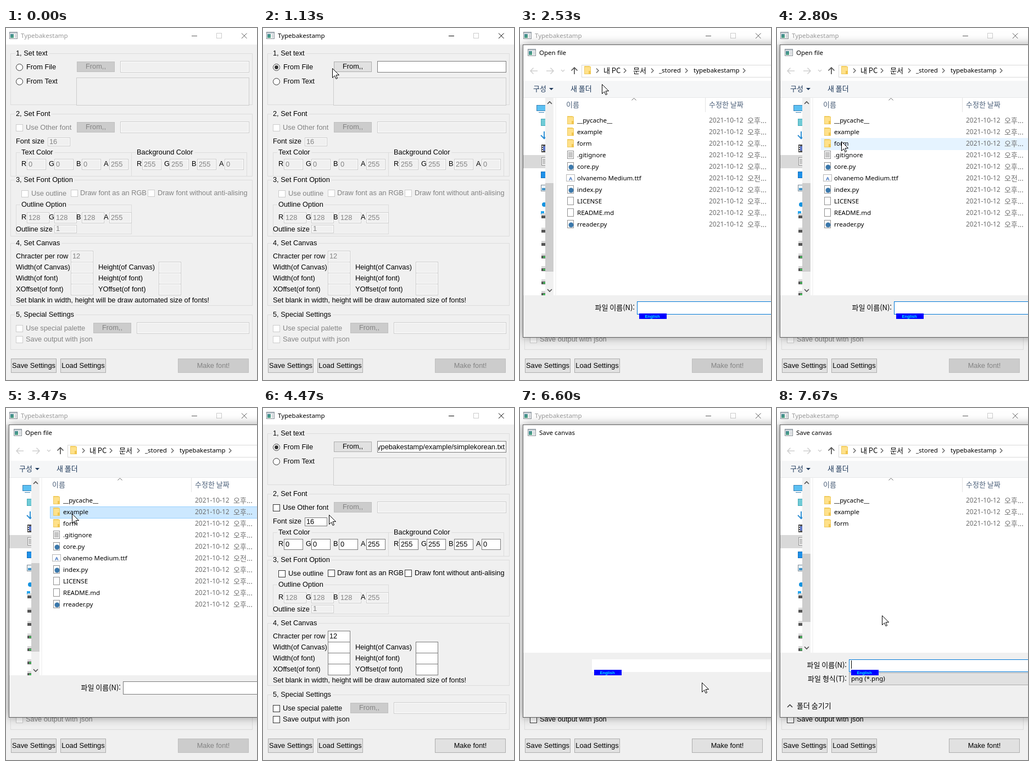
Animation of 457x640 px, one loop 8000 ms. Source, as an HTML page with a canvas:

```html
<!DOCTYPE html>
<html lang="ko">
<head>
<meta charset="utf-8">
<style>
html, body { margin: 0; width: 100%; height: 100%; overflow: hidden; background: #f0f0f0; }
canvas { display: block; width: 100vw; height: 100vh; }
</style>
</head>
<body>
<canvas id="stage" width="457" height="640"></canvas>
<script>
const c = document.getElementById('stage').getContext('2d');
const LOOP = 8000, STEP = 200 / 3;
const FORM = "12.8px 'Liberation Sans', sans-serif";
const UI = "11.5px 'Noto Sans', 'Noto Sans CJK KR', sans-serif";
const DATE = "12px 'Noto Sans', sans-serif";
const KO = "13px 'Noto Sans CJK KR', 'Noto Sans CJK JP', 'Noto Sans CJK', sans-serif";
const GRAY = '#838383', BLUE = '#0078d7', FACE = '#f0f0f0';
const APP = 'Typebakestamp', PROJECT = 'typebakestamp';

const FOLDERS = [['folder', '__pycache__'], ['folder', 'example'], ['folder', 'form']];
const FILES = [...FOLDERS, ['text', '.gitignore'], ['script', 'core.py'], ['font', 'olvanemo Medium.ttf', '오전...'],
  ['script', 'index.py'], ['page', 'LICENSE'], ['page', 'README.md'], ['script', 'rreader.py']];
const SAMPLES = [['text', 'simpleenglish.txt'], ['text', 'simplekorean.txt']];

// Pointer stops: time, x, y
const PATH = [[200, 314, 190], [470, 25, 72], [800, 25, 72], [1200, 158, 73], [2330, 158, 73], [2800, 117, 206],
  [3060, 117, 206], [3130, 120, 192], [3860, 120, 192], [3871, 120, 194], [5260, 120, 194], [5800, 343, 601],
  [6400, 343, 601], [7000, 300, 222], [7130, 300, 222], [7470, 191, 377]];

let t = 0, pointer = null, dialogOpen = false;

const between = (a, b) => t >= a && t < b;

function pointerAt() {
  if (t < PATH[0][0]) return null;
  const i = PATH.findIndex(p => p[0] > t);
  if (i < 0) return PATH.at(-1).slice(1);
  const [t0, x0, y0] = PATH[i - 1], [t1, x1, y1] = PATH[i];
  const u = (t - t0) / (t1 - t0), k = u * u * (3 - 2 * u);
  return [Math.round(x0 + (x1 - x0) * k), Math.round(y0 + (y1 - y0) * k)];
}

function box(x, y, x2, y2, fill, stroke) {
  if (fill) { c.fillStyle = fill; c.fillRect(x, y, x2 - x, y2 - y); }
  if (stroke) {
    c.lineWidth = 1; c.strokeStyle = stroke;
    c.strokeRect(x + .5, y + .5, x2 - x - 1, y2 - y - 1);
  }
}

function text(s, x, cy, color = '#000', font = FORM, align = 'left') {
  c.font = font; c.fillStyle = color; c.textAlign = align;
  c.fillText(s, x, cy + (font === KO ? 5 : 4));
}

function lines(color, width, ...paths) {
  c.strokeStyle = color; c.lineWidth = width; c.beginPath();
  for (const p of paths)
    for (let i = 0; i < p.length; i += 2) i ? c.lineTo(p[i], p[i + 1]) : c.moveTo(p[i], p[i + 1]);
  c.stroke();
}

function disc(x, y, r, fill, stroke) {
  c.beginPath(); c.arc(x, y, r, 0, 7);
  if (fill) { c.fillStyle = fill; c.fill(); }
  if (stroke) { c.lineWidth = 1; c.strokeStyle = stroke; c.stroke(); }
}

// ---- form widgets ----
function group(x, y, x2, y2, title) {
  box(x, y, x2, y2, null, '#dcdcdc');
  c.font = FORM;
  box(x + 8, y - 2, x + 13 + c.measureText(title).width, y + 3, FACE);
  text(title, x + 10, y);
}

function button(x, y, x2, y2, label, enabled) {
  const over = enabled && !dialogOpen && pointer &&
    pointer[0] >= x && pointer[0] < x2 && pointer[1] >= y && pointer[1] < y2;
  const down = over && (between(1330, 1400) || between(6130, 6270));
  box(x, y, x2, y2, !enabled ? '#ccc' : down ? '#cce4f7' : over ? '#e5f1fb' : '#e1e1e1',
    !enabled ? '#bfbfbf' : down ? '#005499' : over ? BLUE : '#adadad');
  text(label, (x + x2) / 2, (y + y2) >> 1, enabled ? '#000' : GRAY, FORM, 'center');
}

function field(x, y, x2, y2, value, enabled) {
  box(x, y, x2, y2, enabled ? '#fff' : FACE, enabled ? '#7a7a7a' : '#ccc');
  if (!enabled) box(x + 1, y + 1, x2 - 1, y2 - 1, null, '#fff');
  text(value, x + 3, (y + y2) >> 1, enabled ? '#000' : GRAY);
}

function check(x, y, label, enabled, labelX = x + 18) {
  box(x, y, x + 13, y + 13, '#fff', enabled ? '#333' : '#ccc');
  text(label, labelX, y + 6, enabled ? '#000' : GRAY);
}

function radio(y, label, checked, over) {
  disc(24.5, y + .5, 6, '#fff', over ? BLUE : '#333');
  if (checked) disc(24.5, y + .5, 3.4, over ? BLUE : '#333');
  text(label, 37, y);
}

function channels(x, y, width, values, enabled) {
  values.forEach((v, i) => {
    text('RGBA'[i], x + 50 * i, y + 9);
    field(x + 10 + 50 * i, y, x + 10 + width + 50 * i, y + 20, v, enabled);
  });
}

function appIcon(x, y) {
  box(x, y, x + 15, y + 13, '#f4f4f4', '#8a9299');
  box(x + 1, y + 1, x + 14, y + 3, '#b9c3cb');
  const g = c.createLinearGradient(x, y, x + 8, y + 12);
  g.addColorStop(0, '#3a6ea5'); g.addColorStop(1, '#4fae7b');
  box(x + 2, y + 4, x + 8, y + 11, g);
  box(x + 10, y + 4, x + 13, y + 11, '#d5dade');
}

function mainWindow() {
  const ready = t >= 4460, fromFile = t >= 730;
  const active = between(730, 1400) || between(4460, 6270);
  const ink = active ? '#000' : '#5a5a5a';
  box(0, 0, 457, 640, FACE);
  box(0, 0, 457, 30, '#fff');
  appIcon(6, 7);
  text(APP, 27, 14, active ? '#000' : '#999', UI);
  lines(ink, 1, [338, 14.5, 348, 14.5], [429, 9.5, 438.5, 19], [438.5, 9.5, 429, 19]);
  box(383, 9, 393, 19, null, '#ccc');

  group(8, 46, 449, 140, '1, Set text');
  radio(71, 'From File', fromFile, between(460, 930));
  radio(97, 'From Text');
  button(129, 61, 198, 80, 'From,,', fromFile);
  field(208, 60, 443, 81, '', fromFile);
  if (ready) {
    c.save();
    c.beginPath(); c.rect(210, 61, 231, 19); c.clip();
    text('ypebakestamp/example/simplekorean.txt', 440, 71, '#000', FORM, 'right');
    c.restore();
  }
  box(128, 90, 443, 141, FACE, '#ccc');

  group(8, 156, 449, 270, '2, Set Font');
  check(18, 175, 'Use Other font', ready);
  button(129, 171, 198, 190, 'From,,', false);
  field(208, 170, 443, 191, '', false);
  text('Font size', 18, 206);
  field(76, 199, 117, 215, '16', ready);
  group(18, 226, 229, 270, 'Text Color');
  group(228, 226, 439, 270, 'Background Color');
  channels(28, 238, 35, ['0', '0', '0', '255'], ready);
  channels(238, 238, 35, ['255', '255', '255', '0'], ready);

  group(8, 276, 449, 379, '3, Set Font Option');
  check(28, 295, 'Use outline', ready);
  check(118, 294, 'Draw font as an RGB', ready, 135);
  check(258, 294, 'Draw font without anti-alising', ready);
  group(18, 321, 229, 375, 'Outline Option');
  channels(28, 335, 41, ['128', '128', '128', '255'], false);
  text('Outline size', 18, 366);
  field(88, 358, 129, 373, '1', false);

  group(8, 391, 449, 505, '4, Set Canvas');
  ['Chracter per row', 'Width(of Canvas)', 'Width(of font)', 'XOffset(of font)'].forEach((label, i) => {
    text(label, 18, 415 + 20 * i);
    field(118, 405 + 20 * i, 159, 426 + 20 * i, i ? '' : '12', ready);
  });
  ['Height(of Canvas)', 'Height(of font)', 'YOffset(of font)'].forEach((label, i) => {
    text(label, 168, 435 + 20 * i);
    field(278, 425 + 20 * i, 319, 446 + 20 * i, '', ready);
  });
  text('Set blank in width, height will be draw automated size of fonts!', 18, 495);

  group(8, 521, 449, 585, '5, Special Settings');
  check(18, 540, 'Use special palette', ready);
  button(159, 536, 228, 555, 'From,,', false);
  field(238, 535, 443, 556, '', false);
  check(18, 560, 'Save output with json', ready);

  button(9, 601, 92, 627, 'Save Settings', true);
  button(99, 601, 182, 627, 'Load Settings', true);
  button(313, 601, 442, 627, 'Make font!', ready);
}

// ---- file dialog ----
function fileIcon(kind, x, y) {
  if (kind === 'folder') {
    box(x + 1, y, x + 11, y + 15, '#f3cf62');
    box(x + 1, y + 1, x + 13, y + 15, '#ffe18a', '#eec95c');
    box(x + 9, y + 9, x + 13, y + 15, '#f0c54f');
    return;
  }
  if (kind === 'font') {
    box(x - 1, y + 1, x + 15, y + 14, '#fff', '#b5b5b5');
    text('A', x + 4, y + 8, '#2b63b8', "bold 9px 'Liberation Sans', sans-serif");
    return;
  }
  box(x + 1, y, x + 13, y + 15, '#fff', '#8f8f8f');
  if (kind === 'text') for (let i = 3; i < 13; i += 2) box(x + 3, y + i, x + 11, y + i + 1, '#8f8f8f');
  if (kind === 'script') disc(x + 8, y + 9, 4.5, '#3b78ab');
}

function sidebar(bottom, thumbTop, thumbEnd) {
  c.save();
  c.beginPath(); c.rect(6, 127, 40, bottom - 127); c.clip();
  box(6, 231, 46, 255, '#d9d9d9');
  box(30, 140, 47, 151, '#5cc0f2', '#3a82b5');
  box(34, 153, 44, 154, '#3a82b5');
  box(38, 165, 48, 178, '#6fcbd6', '#45a9b8');
  lines('#2d8fd5', 2, [44, 188, 44, 202], [38, 195, 44, 201, 50, 195]);
  box(39, 212, 48, 226, '#555', '#333');
  for (let y = 214; y < 226; y += 4) box(40, y, 42, y + 2, '#fff');
  box(42, 215, 48, 223, '#5a75c8');
  fileIcon('text', 38, 235);
  box(38, 261, 48, 273, '#1e90e8', '#1270bd');
  box(38, 285, 48, 297, '#e9f3fa', '#7d8a94');
  box(40, 291, 48, 295, '#3a8fc4');
  disc(44, 321, 4, '#1593e0');
  box(38, 333, 44, 339, '#22a5ef');
  [341, 367, 391, 414, 437, 461, 482].forEach((y, i) => {
    box(39, y, 48, y + 5, '#555');
    box(39, y - 4, 48, y, '#d8d8d8');
    if (i > 2) box(42, y + 1, 46, y + 4, '#46b95a');
  });
  c.restore();
  box(46, 127, 61, bottom, FACE);
  box(46, thumbTop, 61, thumbEnd, '#cdcdcd');
  lines('#505050', 1.6, [50, 138, 54, 134, 58, 138], [50, bottom - 11, 54, bottom - 7, 58, bottom - 11]);
  box(64, 127, 66, bottom, '#f5f5f5');
}

function navigation(inExample) {
  const back = inExample ? '#555' : '#d0d0d0';
  lines(back, 1.5, [19, 78, 32, 78], [24.5, 72.5, 19, 78, 24.5, 83.5]);
  lines('#d0d0d0', 1.5, [48, 78, 61, 78], [55.5, 72.5, 61, 78, 55.5, 83.5], [75, 76, 78, 79, 81, 76]);
  lines('#555', 1.7, [99, 72, 99, 84], [93.5, 77.5, 99, 72, 104.5, 77.5]);
  box(112, 67, 470, 90, '#fff', '#d9d9d9');
  fileIcon('folder', 116, 69);
  lines('#555', 1.2, ...[141, 191, 241, 303, 408].map(x => [x - 2, 73.5, x + 2, 77.5, x - 2, 81.5]));
  text('내 PC', 152, 77, '#000', KO);
  text('문서', 206, 77, '#000', KO);
  text('_stored', 253, 77, '#000', UI);
  text(PROJECT, 316, 77, '#000', UI);
  if (inExample) text('example', 418, 77, '#000', UI);

  box(6, 96, 457, 126, '#f5f6f7');
  box(6, 126, 457, 127, '#e8e9ea');
  text('구성', 24, 110, '#1e395b', KO);
  c.fillStyle = '#1e395b';
  c.beginPath(); c.moveTo(53, 109); c.lineTo(61, 109); c.lineTo(57, 113); c.fill();
  text('새 폴더', 92, 110, '#1e395b', KO);
  text('이름', 84, 139, '#4c607a', KO);
  text('수정한 날짜', 344, 139, '#4c607a', KO);
  lines('#666', 1, [203.5, 131.5, 207.5, 127.5, 211.5, 131.5]);
  box(337, 127, 338, 153, '#e2e2e2');
}

function fileList(rows, selecting) {
  const over = Math.floor((pointer[1] - 158) / 21);
  rows.forEach(([kind, name, noon = '오후...'], i) => {
    const y = 158 + 21 * i;
    if (i === over) box(80, y, 470, y + 22, selecting ? '#cce8ff' : '#e5f3ff', selecting ? '#99d1ff' : null);
    fileIcon(kind, 85, y + 2);
    text(name, 104, y + 10, '#000', UI);
    text('2021-10-12', 344, y + 10, '#6d6d6d', DATE);
    text(noon, 414, y + 10, '#6d6d6d', KO);
  });
}

function inputBadge(x, y) {
  box(x, y, x + 50, y + 10, '#00f');
  text('English', x + 24, y + 4, '#00e5ff', "bold 7.5px 'Liberation Sans', sans-serif", 'center');
}

function dialog(save, openedAt, stage, fade = 1) {
  const u = Math.min(1, (t - openedAt) / 200), k = 1 - (1 - u) ** 2;
  const scale = .9 + .1 * k, bottom = save ? 445 : 486;
  c.save();
  c.globalAlpha = Math.max(.1, k) * fade;
  c.translate(350, 296); c.scale(scale, scale); c.translate(-350, -296);
  c.save();
  c.shadowColor = 'rgba(0,0,0,.38)'; c.shadowBlur = 16;
  box(5, 30, 800, 563, '#fff');
  c.restore();
  box(5, 30, 800, 563, '#fff', '#5c5c5c');
  box(6, bottom, 799, 562, FACE);
  appIcon(14, 38);
  text(save ? 'Save canvas' : 'Open file', 35, 45, '#000', UI);

  const inExample = !save && t >= 3530;
  if (stage > 1) navigation(inExample);
  if (stage > 2) {
    save ? sidebar(bottom, 265, 389) : sidebar(bottom, 282, 443);
    if (save) fileList(FOLDERS, false);
    else if (!inExample) fileList(FILES, t >= 3270);
    else if (t >= 3600) fileList(SAMPLES, t >= 4200);
  }

  const focused = save || t < 3270, border = stage > 1 ? (focused ? BLUE : '#7a7a7a') : null;
  if (save) {
    box(131, 457, 800, 480, '#fff', border);
    if (stage > 0) {
      text('파일 이름(N):', 127, 467, '#000', KO, 'right');
      text('파일 형식(T):', 127, 492, '#000', KO, 'right');
      box(131, 481, 800, 504, '#e1e1e1', '#adadad');
      text('png (*.png)', 135, 492, '#000', UI);
      lines('#333', 1.5, [19, 544, 23.5, 539.5, 28, 544]);
      text('폴더 숨기기', 36, 541, '#000', KO);
    }
    if (t >= 7660) box(135, 459, 136, 474, '#000');
    inputBadge(135, 476);
  } else {
    box(213, 497, 800, 521, '#fff', border);
    if (stage > 0) text('파일 이름(N):', 209, 508, '#000', KO, 'right');
    else box(136, 501, 208, 516, '#fff');
    if (focused) stage > 0 ? inputBadge(217, 519) : inputBadge(325, 516);
  }
  c.restore();
}

function drawPointer([x, y]) {
  const shape = [0, 0, 0, 17, 4, 13.2, 6.6, 19, 9, 18, 6.5, 12.2, 12, 12];
  c.beginPath();
  for (let i = 0; i < shape.length; i += 2) c.lineTo(x + .5 + shape[i], y + .5 + shape[i + 1]);
  c.closePath();
  c.fillStyle = '#fff'; c.fill();
  c.lineWidth = 1; c.strokeStyle = '#000'; c.stroke();
}

function draw(now) {
  t = Math.floor((now % LOOP) / STEP + 1e-6) * STEP + 5;
  pointer = pointerAt();
  const opening = between(1600, 4330), saving = t >= 6400;
  dialogOpen = opening || saving;
  mainWindow();
  if (opening) dialog(false, 1600, (t >= 2060) + (t >= 2260) + (t >= 2330), t >= 4260 ? .5 : 1);
  if (saving) dialog(true, 6400, (t >= 6860) + (t >= 7000) + (t >= 7060));
  if (pointer) drawPointer(pointer);
}

const start = performance.now();
function frame() {
  draw(performance.now() - start);
  requestAnimationFrame(frame);
}
frame();
</script>
</body>
</html>
```
